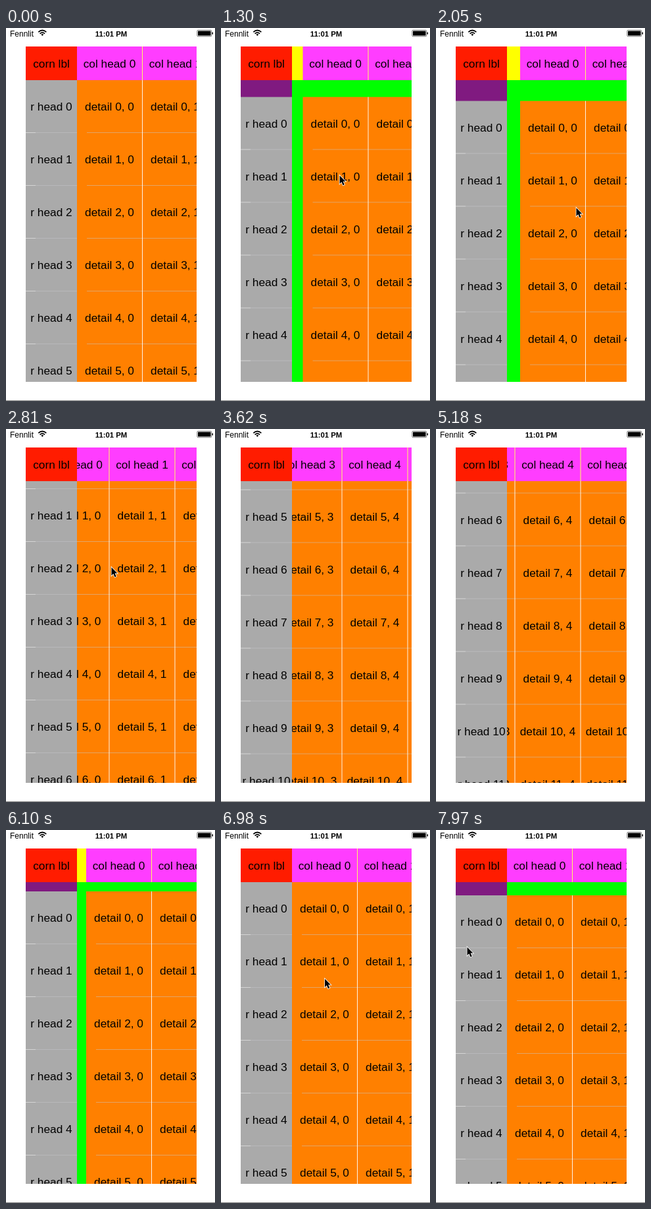
An HTML page for the animation above (8 s loop, 318x565 px).

```html
<!DOCTYPE html>
<html lang="en">
<head>
<meta charset="utf-8">
<title>Scrolling grid</title>
<style>
  html, body { margin: 0; width: 100%; height: 100%; overflow: hidden; background: #fff; }
  #stage { display: block; width: 318px; height: 565px; }
  text { font: 17.3px "Liberation Sans", Arial, sans-serif; text-anchor: middle; }
  .status { font-size: 12px; text-anchor: start; }
  .clock { font-size: 11.3px; font-weight: bold; }
  .rule { fill: #c8c7cc; opacity: .5; }
  .inset { fill: #fff; opacity: .5; }
  .divider { fill: #fff; opacity: .9; }
  .gap { fill: #ffff60; }
</style>
</head>
<body>
<svg id="stage" viewBox="0 0 318 565">
  <rect width="318" height="565" fill="#fff"/>
  <text class="status" x="6" y="12.5">Fennlit</text>
  <g fill="none" stroke="#000" stroke-width="1.8">
    <path d="M49.3 6.2Q55.3 0.8 61.3 6.2"/>
    <path d="M51.6 8.6Q55.3 5.2 59 8.6"/>
    <path d="M53.3 9.8Q55.3 8 57.3 9.8L55.3 12Z" fill="#000" stroke="none"/>
  </g>
  <text class="clock" x="160" y="12.5">11:01 PM</text>
  <rect x="290.75" y="3.25" width="22" height="9.5" rx="1.5" fill="none" stroke="#000" stroke-width=".5"/>
  <rect x="292" y="4.5" width="19.5" height="7" rx=".5"/>
  <rect x="313.5" y="6.5" width="1.5" height="3"/>
  <g id="grid"></g>
  <rect x="30" y="28" width="78" height="51" fill="#ff1c00"/>
  <text x="69" y="60">corn lbl</text>
  <rect y="564" width="318" height="1" fill="#808080"/>
  <path id="cursor" d="M.5 1.5V14L3.3 11.3L5.5 16.3L7.7 15.4L5.6 10.6H9.4Z"
    stroke="#fff" stroke-width="1.6" paint-order="stroke"/>
</svg>
<script>
const LOOP = 8000, STEP = 58;
const ROWS = 12, COLS = 6, ROW_H = 80, COL_W = 100;
const VIEW_W = 182, VIEW_H = 457;

const clamp = p => Math.min(1, Math.max(0, p));
const easeOut = p => 1 - (1 - p) ** 2;
const easeInOut = p => p < 0.5 ? 2 * p * p : 1 - 2 * (1 - p) ** 2;
const overshoot = p => 1 + 3.3 * (p - 1) ** 3 + 2.3 * (p - 1) ** 2;
const progress = (t, start, end) => clamp((t - start) / (end - start));

// The pointer rests after each move, until it hides or moves again.
const approach = { start: 420, end: 770, from: [302, 247], to: [147, 172.5], ease: overshoot };
const pull = { start: 1125, end: 1700, from: approach.to, to: [213, 271], ease: easeOut };
const flick = { start: 2622, end: 2982, from: pull.to, to: [107, 145], ease: easeInOut, hide: 2960 };
const regrab = { start: 5290, end: 5410, from: [123, 127], to: [134, 143], ease: easeOut };
const flickBack = { start: 5560, end: 5800, from: regrab.to, to: [168, 232], ease: easeInOut, hide: 5760 };
const comeBack = { start: 6970, end: 7450, from: flickBack.to, to: [47, 138], ease: overshoot };
const pullDown = { start: 7640, end: 7960, from: comeBack.to, to: [47, 176], ease: easeOut };
const moves = [approach, pull, flick, regrab, flickBack, comeBack, pullDown];

function pointer(t) {
  const move = moves.filter(m => m.start <= t).pop();
  if (!move || t >= move.hide) return null;
  const p = move.ease(progress(t, move.start, move.end));
  return move.from.map((v, i) => v + (move.to[i] - v) * p);
}

// Pulling past the edge moves the content less and less.
function rubber(from, at) {
  return [VIEW_W, VIEW_H].map((size, i) => {
    const d = (at[i] - from[i]) * 0.55;
    return -d / (1 + d / size);
  });
}

const scale = (v, k) => v.map(n => n * k);

function offset(t) {
  if (t < pull.start) return [0, 0];
  if (t < 1950) return rubber(pull.from, pointer(t));
  if (t < flick.start) {
    const u = (t - 1950) / 80;
    return scale(rubber(pull.from, pull.to), (1 + u) * Math.exp(-u));
  }
  if (t < 2800) return pointer(t).map((v, i) => flick.from[i] - v);
  if (t < flickBack.start) {
    const k = Math.exp((2800 - t) / 500);
    return [390.6 - 341.5 * k, 464.8 - 398.4 * k];
  }
  if (t < 5860) return scale([388, 461], 1 - easeInOut(progress(t, 5560, 5870)));
  if (t < 6500) {
    const u = t - 5860, bounce = -0.768 * u * Math.exp(-u / 95);
    return [bounce, bounce];
  }
  return t < pullDown.start ? [0, 0] : rubber(pullDown.from, pointer(t));
}

const range = n => [...Array(n).keys()];
const each = (n, make) => range(n).map(make).join('');
const rect = (x, y, w, h, attrs) =>
  `<rect x="${x}" y="${y}" width="${w}" height="${h}" ${attrs}/>`;
const fill = color => `fill="${color}"`;
const label = (x, y, s) => `<text x="${x}" y="${y}">${s}</text>`;
const pane = (x, y, w, h, back, body) =>
  `<svg x="${x}" y="${y}" width="${w}" height="${h}">` +
  rect(0, 0, w, h, fill(back)) + `<g>${body}</g></svg>`;

const rules = (x, w, kind) => each(ROWS, r =>
  rect(x, (r + 1) * ROW_H - 1, w, 1, `class="${kind}"`));
const dividers = (h, kind) => each(COLS, c =>
  rect((c + 1) * COL_W - 1, 0, 1, h, `class="${kind}"`));
const colMid = c => c * COL_W + 49.5;
const rowBase = r => r * ROW_H + 46;

function makeGrid(root) {
  const width = COLS * COL_W, height = ROWS * ROW_H;
  const heads = rect(0, 0, width, 51, fill('#ff3dff')) + dividers(51, 'gap') +
    each(COLS, c => label(colMid(c), 32, `col head ${c}`));
  const sides = rect(0, 0, 78, height, fill('#aaa')) +
    rules(0, 15, 'inset') + rules(15, 63, 'rule') +
    each(ROWS, r => label(39, rowBase(r), `r head ${r}`));
  const cells = rect(0, 0, width, height, fill('#ff8000')) +
    rules(15, width - 15, 'rule') + dividers(height, 'divider') +
    each(ROWS, r => each(COLS, c => label(colMid(c), rowBase(r), `detail ${r}, ${c}`)));
  root.innerHTML = pane(108, 28, VIEW_W, 51, '#ff0', heads) +
    pane(30, 79, 78, VIEW_H, '#801a80', sides) +
    pane(108, 79, VIEW_W, VIEW_H, '#0f0', cells);
  const [h, s, d] = root.querySelectorAll('g');
  const shift = (g, x, y) => g.setAttribute('transform', `translate(${-x} ${-y})`);
  return ([x, y]) => { shift(h, x, 0); shift(s, 0, y); shift(d, x, y); };
}

const scrollTo = makeGrid(document.getElementById('grid'));
const cursor = document.getElementById('cursor');
const half = v => Math.round(v * 2) / 2;

function draw(time) {
  // The picture advances in even steps.
  const t = Math.floor((time % LOOP - 10) / STEP) * STEP + 18;
  scrollTo(offset(t).map(half));
  const at = pointer(t);
  cursor.setAttribute('visibility', at ? 'visible' : 'hidden');
  if (at) cursor.setAttribute('transform', `translate(${at})`);
}

const began = performance.now();
function tick() {
  draw(performance.now() - began);
  requestAnimationFrame(tick);
}
tick();
</script>
</body>
</html>
```
